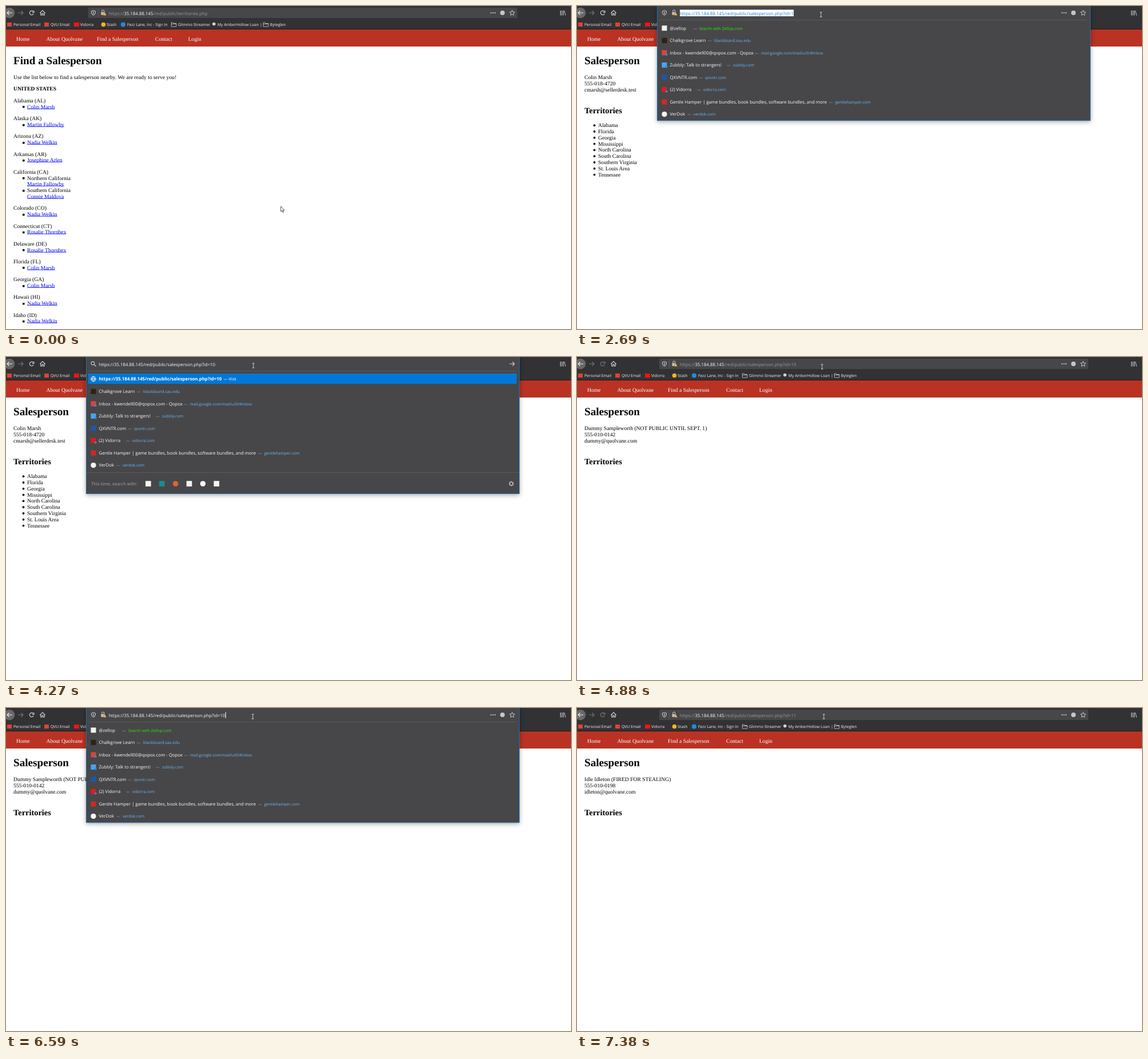
An HTML page with a canvas that plays this animation: 989x566 px, repeating every 9.55 s.

```html
<!DOCTYPE html>
<html lang="en">
<head>
<meta charset="utf-8">
<title>Find a Salesperson</title>
<style>
html, body { margin: 0; width: 100%; height: 100%; overflow: hidden; background: #fff; }
canvas { display: block; }
</style>
</head>
<body>
<canvas id="stage" width="989" height="566"></canvas>
<script>
const c = document.getElementById('stage').getContext('2d');
const LOOP = 9550;
const SERIF = '"Liberation Serif", serif', SANS = '"Open Sans", sans-serif';
const BODY = `9.6px ${SERIF}`, BOLD = `bold 9.6px ${SERIF}`;
const H1 = `bold 19.2px ${SERIF}`, H2 = `bold 14.4px ${SERIF}`;
const UI = `7.8px ${SANS}`, UI_BOLD = `bold 7.8px ${SANS}`, SMALL = `7.03px ${SANS}`, MARK = `6.85px ${SANS}`;
const ICON = '#d4d4d6', DIM = '#77777a';
const HOST = '35.184.88.145';

const states = [
  ['Alabama (AL)', 'Colin Marsh'], ['Alaska (AK)', 'Martin Fallowby'],
  ['Arizona (AZ)', 'Nadia Welkin'], ['Arkansas (AR)', 'Josephine Arlen'],
  ['California (CA)', 'Martin Fallowby', 'Connie Maldova'],
  ['Colorado (CO)', 'Nadia Welkin'], ['Connecticut (CT)', 'Rosalie Thornbex'],
  ['Delaware (DE)', 'Rosalie Thornbex'], ['Florida (FL)', 'Colin Marsh'],
  ['Georgia (GA)', 'Colin Marsh'], ['Hawaii (HI)', 'Nadia Welkin'], ['Idaho (ID)', 'Nadia Welkin']
];
const people = [
  ['Colin Marsh', '555-018-4720', 'cmarsh@sellerdesk.test'],
  ['Dummy Sampleworth (NOT PUBLIC UNTIL SEPT. 1)', '555-010-0142', 'dummy@quolvane.com'],
  ['Idle Idleton (FIRED FOR STEALING)', '555-010-0198', 'idleton@quolvane.com']
];
const territories = ['Alabama', 'Florida', 'Georgia', 'Mississippi', 'North Carolina',
  'South Carolina', 'Southern Virginia', 'St. Louis Area', 'Tennessee'];
// title, address, address x, icon colour, round icon, bookmarked
const suggestions = [
  ['@zellop', 'Search with Zellop.com', 214, '#f2f2f2'],
  ['Chalkgrove Learn', 'blackboard.sau.edu', 240, '#2b2318'],
  ['Inbox - kwendell00@qopox.com - Qopox', 'mail.google.com/mail/u/0/#inbox', 322, '#d9453a', 0, 1],
  ['Zubbly: Talk to strangers!', 'zubbly.com', 273, '#4aa3ee', 0, 1],
  ['QXVNTR.com', 'qxvntr.com', 224, '#1d57ad'],
  ['(2) Vidorra', 'vidorra.com', 221, '#e01b1b', 0, 1],
  ['Gentle Hamper | game bundles, book bundles, software bundles, and more', 'gentlehamper.com', 452, '#cc2929'],
  ['VerDok', 'verdok.com', 204, '#f5f5f5', 1]
];
const bookmarks = [[13, 'Personal Email'], [78, 'QVU Email'], [130, 'Vidorra'], [176, 'Stash'],
  [212, 'Fezz Lane, Inc - Sign In'], [301, 'Glimmo Streamer'], [370, 'My AmberHollow Loan |'], [462, 'Byteglen']];

function text(x, y, s, font, color = '#000') {
  c.font = font;
  c.fillStyle = color;
  c.fillText(s, x, y);
  return x + c.measureText(s).width;
}
function rect(x, y, w, h, color) { c.fillStyle = color; c.fillRect(x, y, w, h); }
function disc(x, y, r, color) {
  c.fillStyle = color;
  c.beginPath(); c.arc(x, y, r, 0, 7); c.fill();
}
function path(d, x, y, stroke, width = 1, fill) {
  const p = new Path2D(d);
  c.save();
  c.translate(x, y);
  if (fill) { c.fillStyle = fill; c.fill(p); }
  if (stroke) { c.strokeStyle = stroke; c.lineWidth = width; c.stroke(p); }
  c.restore();
}
function link(y, s) {
  const end = text(37, y, s, BODY, '#0000ee');
  rect(37, Math.round(y), end - 37, 1, '#4646f2');
}

function drawTerritoryPage() {
  text(13, 102, 'Find a Salesperson', H1);
  text(13, 128.4, 'Use the list below to find a salesperson nearby. We are ready to serve you!', BODY);
  text(13, 148.4, 'UNITED STATES', BOLD);
  let y = 169;
  for (const [state, ...names] of states) {
    text(13, y, state, BODY);
    names.forEach((name, i) => {
      y += 10.8;
      rect(29, Math.round(y - 4.5), 3.5, 3.5, '#000');
      if (names.length > 1) {
        text(37, y, ['Northern', 'Southern'][i] + ' California', BODY);
        y += 10.8;
      }
      link(y, name);
    });
    y += 20.4;
  }
}
function drawPersonPage(n) {
  text(13, 102, 'Salesperson', H1);
  people[n].forEach((line, i) => text(13, 128.4 + i * 10.8, line, BODY));
  text(13, 188, 'Territories', H2);
  if (n === 0) territories.forEach((name, i) => {
    const y = 212.2 + i * 10.8;
    disc(30.5, y - 3, 1.9, '#000');
    text(37, y, name, BODY);
  });
}
function drawNav() {
  rect(0, 41, 989, 30, '#ba3223');
  [[18, 'Home'], [70.5, 'About Quolvane'], [159, 'Find a Salesperson'], [261, 'Contact'], [319, 'Login']]
    .forEach(([x, s]) => text(x, 60.6, s, BODY, '#fff'));
}

function drawToolbar(reload) {
  rect(0, 0, 989, 41, '#323234');
  rect(0, 40, 989, 1, '#19191b');
  disc(6, 12, 9.3, '#68686b');
  path('M5 0H-4M-.5-3.5L-4 0L-.5 3.5', 6, 12, '#eee', 1.1);
  path('M-5 0H4M.5-3.5L4 0L.5 3.5', 26, 12, DIM, 1.1);
  if (reload === 'stop') path('M-3-3L3 3M3-3L-3 3', 45, 12, ICON, 1.1);
  else path('M3.2 1.6A3.6 3.6 0 1 1 2.6-2.5M4-4V-.8H.8', 45, 12, reload === 'dim' ? DIM : ICON, 1.2);
  path('M-4.8.3L0-4.2L4.8.3M-3.2-.5V4H-1V1H1V4H3.2V-.5', 64, 12, ICON, 1.1);
  path('M970.5 8V16.5M973 8V16.5M975.5 8V16.5M977 8L979.5 16.5', 0, 0, ICON, 1);

  [2, 67].forEach(x => rect(x, 29, 8, 7, '#dc4437'));
  rect(119, 29, 9, 7, '#f01414');
  disc(170.5, 32.5, 3.8, '#f2b61c');
  disc(205, 32.5, 4, '#2388e0');
  disc(364, 31.5, 2.8, '#d2d2d4');
  [289, 450].forEach(x => path('M.5 .5H3.5L4.5 2H9V7.5H.5ZM.5 3H9', x, 28.5, '#bcbcbe', .9));
  bookmarks.forEach(([x, s]) => text(x, 35, s, MARK, '#f4f4f5'));
}
function drawFieldIcons() {
  path('M0-4L3.4-3V0Q3 3 0 4.3Q-3 3-3.4 0V-3Z', 153, 12, ICON, 1);
  path('M0-2V2.4', 153, 12, ICON, 1.2);
  path('M-2.2-.5V-2A2 2 0 0 1 1.8-2V-.5', 170, 11, '#c4c4c6', 1.1);
  rect(166.5, 10.7, 7, 5, '#c4c4c6');
  path('M0-3L3.2 3H-3.2Z', 172.7, 13.6, '#474749', .5, '#f5c42c');
  [849, 852.5, 856].forEach(x => disc(x, 12, 1.1, ICON));
  disc(869, 12, 4, '#c6c6c8');
  path('M0-4.5L1.3-1.5L4.5-1.2L2.1 1L2.8 4.2L0 2.5L-2.8 4.2L-2.1 1L-4.5-1.2L-1.3-1.5Z', 886, 12, ICON, .9);
}
function drawField(file) {
  c.fillStyle = '#474749';
  c.beginPath(); c.roundRect(144, 3, 751, 18, 1.5); c.fill();
  drawFieldIcons();
  rect(161, 5, .7, 14, '#626265');
  let x = text(180, 15.6, 'https://', UI, '#98989b');
  x = text(x, 15.6, HOST, UI, '#f9f9fa');
  text(x, 15.6, '/red/public/' + file, UI, '#98989b');
}

function drawPanel({ file, typing, selected, caret, rows }) {
  const bottom = 28.8 + rows * 21.55 + (typing ? 38.8 : 0);
  c.save();
  c.shadowColor = 'rgba(0,0,0,.35)';
  c.shadowBlur = 8;
  c.shadowOffsetY = 2;
  rect(140, -2, 759, bottom + 2, '#474749');
  c.restore();
  c.strokeStyle = '#1f6fb5';
  c.lineWidth = 1;
  c.strokeRect(140.5, -2.5, 758, Math.round(bottom) + 2);
  rect(144, 24, 749, 1, '#5a5a5d');

  const url = `https://${HOST}/red/public/${file}`;
  const left = typing ? 162.5 : 180;
  c.font = UI;
  const end = left + c.measureText(url).width;
  if (selected) rect(left, 6.5, end - left, 11.5, '#fff');
  text(left, 15.6, url, UI, selected ? '#1583d8' : '#f9f9fa');
  if (caret) rect(Math.round(end), 7, 1, 11, '#f9f9fa');
  if (typing) {
    path('M2 2L5 5M2.4 -.5A2.9 2.9 0 1 1-3.4-.5A2.9 2.9 0 1 1 2.4-.5', 152.5, 11.5, ICON, 1.1);
    path('M-4.5 0H4M.5-3.5L4 0L.5 3.5', 886, 12, ICON, 1.1);
  } else drawFieldIcons();

  suggestions.slice(0, rows).forEach(([title, address, x, color, round, marked], i) => {
    const y = 38.8 + i * 21.55;
    if (typing && i === 0) {
      rect(144, 29, 750, 18, '#0078d7');
      path('M4.2 0A4.2 4.2 0 1 1-4.2 0A4.2 4.2 0 1 1 4.2 0M-4 0H4M0-4Q-4 0 0 4Q4 0 0-4', 153, 38.4, '#fff', 1);
      const after = text(162.5, 41.4, url, UI_BOLD, '#fff');
      text(after + 3.5, 41.4, '— Visit', SMALL, '#fff');
      return;
    }
    if (round) disc(153, y, 4.7, color);
    else rect(148.5, y - 4.5, 9, 9, color);
    if (marked) disc(156.7, y + 3.2, 2, '#2a8eea');
    text(162.5, y + 2.7, title, UI, '#f9f9fa');
    text(x - 11, y + 2.7, '—', SMALL, '#a4a4a6');
    text(x, y + 2.7, address, SMALL, i ? '#6cb5f3' : '#30e60b');
  });

  if (!typing) return;
  const y = bottom - 18;
  rect(141, Math.round(y - 20), 757, 1, '#5a5a5d');
  text(149, y + 3, 'This time, search with:', UI, '#a5a5a8');
  ['#f4f4f4', '#138f91', '#dc6330', '#f4f4f4', '#f4f4f4', '#f4f4f4'].forEach((color, i) => {
    const x = 249 + i * 23.9;
    if (i === 2 || i === 4) disc(x, y, 4.8, color);
    else rect(x - 4.8, y - 4.8, 9.6, 9.6, color);
  });
  path('M2.8 0A2.8 2.8 0 1 1-2.8 0A2.8 2.8 0 1 1 2.8 0M0-4.6V-3M0 3V4.6M-4.6 0H-3M3 0H4.6' +
    'M-3.2-3.2L-2-2M2 2L3.2 3.2M-3.2 3.2L-2 2M2-2L3.2-3.2', 884.5, y, ICON, 1.1);
}

// time, x, y of the pointer
const moves = [[150, 481, 351], [400, 420, 318], [700, 215, 226], [990, 66, 178], [1150, 62, 175],
  [1230, 130, 168], [1310, 250, 157], [1460, 312, 147], [1540, 336, 137], [1900, 392, 66],
  [2380, 425, 15], [3160, 430, 15], [3710, 433, 15], [4580, 433, 15], [4880, 429, 17],
  [5430, 429, 17], [5580, 431, 16], [5810, 431, 16], [5890, 432, 15]];

function pointerAt(t) {
  const i = moves.findIndex(m => m[0] > t);
  if (i === 0) return moves[0].slice(1);
  if (i < 0) return moves[moves.length - 1].slice(1);
  const [t0, x0, y0] = moves[i - 1], [t1, x1, y1] = moves[i];
  const k = (t - t0) / (t1 - t0);
  return [x0 + (x1 - x0) * k, y0 + (y1 - y0) * k];
}
function drawPointer(t) {
  const [x, y] = pointerAt(t);
  if (y < 22) path('M-2-4H2M-2 4H2M0-4V4', x, y, '#d8d8da', .9);
  else if (t > 960 && t < 1200) {
    path('M-1 4V-1Q0-2 1-1V3Q2 2 3 3Q4 2.5 5 3.5Q6 3 6.5 4V7L5 10H0L-3 6Q-3 4-1 6Z', x, y, '#000', .7, '#fff');
  } else path('M0 0V9.3L2.1 7.4L3.6 10.8L5 10.2L3.6 6.9H6.4Z', x, y, '#222', .8, '#fff');
}

function draw(t) {
  const within = (a, b) => t >= a && t < b;
  const page = t < 1230 ? 0 : t < 4660 ? 1 : t < 7380 ? 2 : 3;
  const typing = within(3710, 4500) || within(6670, 7290);
  const open = within(2460, 4500) || within(5430, 7290);
  const id = within(6670, 6820) ? 1 : t < 3710 ? 1 : t < 6820 ? 10 : 11;
  const file = t < 1230 ? 'territories.php' : 'salesperson.php?id=' + id;
  const loading = within(1070, 1230) || within(4500, 4660) || within(7290, 7380);
  const settled = within(1230, 1880) || within(4660, 5430) || t >= 7380;

  rect(0, 0, 989, 566, '#fff');
  if (page) drawPersonPage(page - 1);
  else drawTerritoryPage();
  drawNav();
  drawToolbar(loading ? 'stop' : settled ? 'dim' : '');
  if (open) {
    const selected = within(2460, 3160) || within(5430, 6060);
    const caret = !selected && !within(4270, 4500) && !within(7140, 7290);
    drawPanel({ file, typing, selected, caret, rows: t >= 6990 ? 1 : 8 });
  } else drawField(file);
  drawPointer(t);
}

c.textRendering = 'geometricPrecision';
const start = performance.now();
function tick() {
  draw((performance.now() - start) % LOOP);
  requestAnimationFrame(tick);
}
tick();
</script>
</body>
</html>
```
